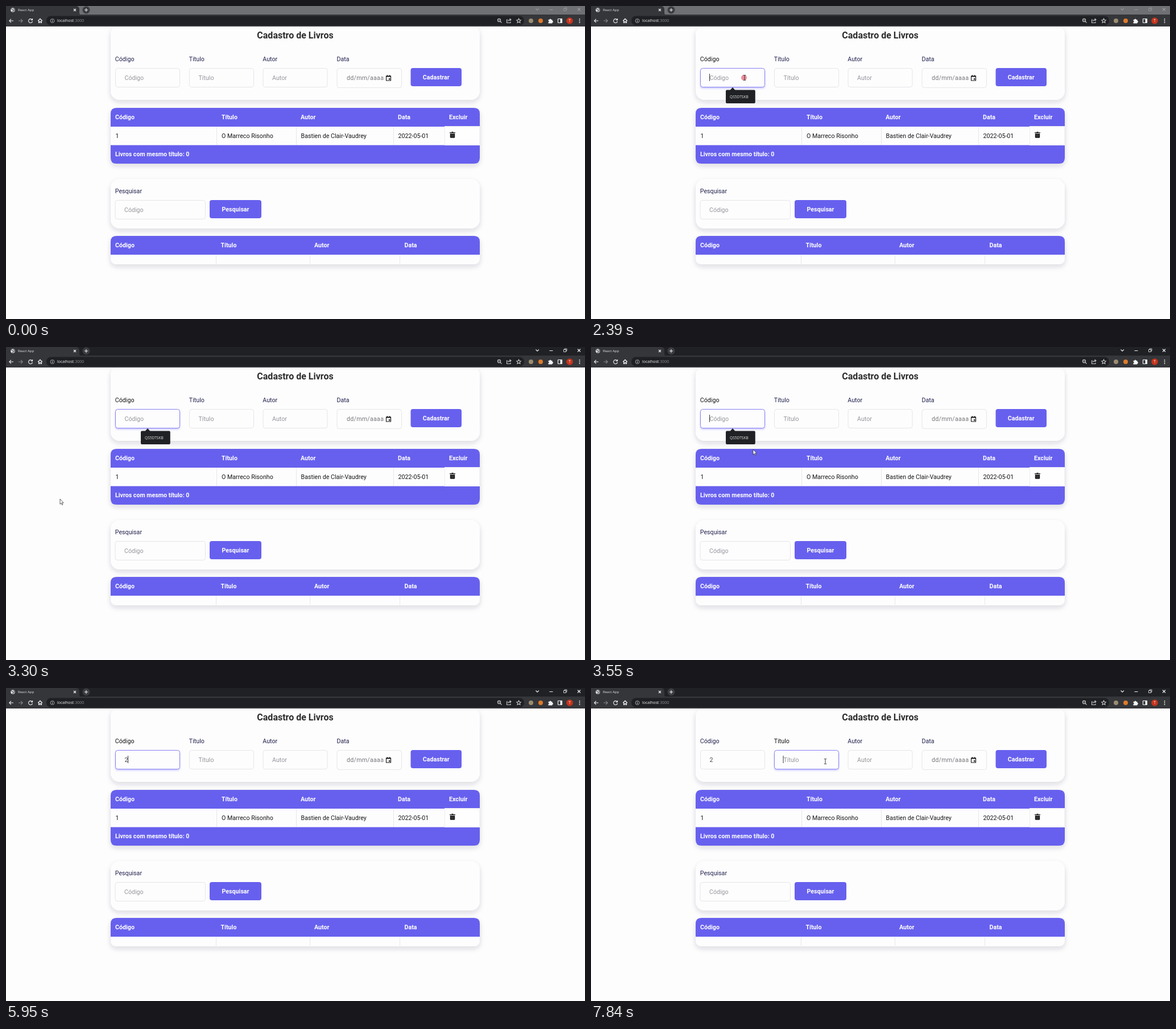
Write an HTML page that moves like this. It is 1018 px wide and 550 px high and loops after 8000 ms.

```html
<!DOCTYPE html>
<html lang="pt">
<head>
<meta charset="utf-8">
<title>Cadastro de Livros</title>
<style>
  html, body { margin: 0; width: 100%; height: 100%; overflow: hidden; background: #fdfdfd; }
  svg { display: block; }
  text { font: 10.67px Roboto, Arial, sans-serif; white-space: pre; }
  .ui { font-family: "Open Sans", "Noto Sans", sans-serif; }
  .bold { font-weight: 700; fill: #fff; }
  .label { fill: #20204c; }
  .hint { fill: #96969c; }
  .cell { fill: #161616; }
  .line { fill: none; stroke: #e8e8eb; }
  .icon { fill: none; stroke: #f1f1f1; stroke-width: 1.1; }
</style>
</head>
<body>
<svg id="stage" width="1018" height="550" viewBox="0 0 1018 550"></svg>
<script>
const LOOP = 8000;
const PURPLE = '#6760ee';
const stage = document.getElementById('stage');

const rect = (x, y, w, h, fill, r = 0, extra = '') =>
  `<rect x="${x}" y="${y}" width="${w}" height="${h}" rx="${r}" fill="${fill}" ${extra}/>`;
const text = (x, y, value, cls, extra = '') =>
  `<text x="${x}" y="${y}" class="${cls}" ${extra}>${value}</text>`;
const path = (d, extra = 'class="icon"') => `<path d="${d}" ${extra}/>`;
const dot = (x, y, r, fill, extra = '') => `<circle cx="${x}" cy="${y}" r="${r}" fill="${fill}" ${extra}/>`;
const middle = 'text-anchor="middle"';

const card = (y, h, r) => rect(184, y, 649, h, '#fdfdfe', r, 'filter="url(#shadow)"');
const button = (x, y, w, label) =>
  rect(x, y, w, 32, PURPLE, 4) + text(x + w / 2, y + 19.8, label, 'bold', middle);
const input = (id, x, y, w, h, hint) =>
  rect(x + .5, y + .5, w - 1, h - 1, '#fdfdfe', 4, `id="${id}Box" stroke="#e6e6e9"`) +
  text(x + 16.5, y + 20.5, hint, 'hint', `id="${id}Text"`);
const headings = (y, items) => items.map(([x, label]) => text(x, y, label, 'bold')).join('');
const columns = (xs, top, bottom) => path(xs.map(x => `M${x}.5 ${top}V${bottom}`).join(''), 'class="line"');

function browserBar() {
  return rect(0, 0, 1018, 16, '#6f7073', 0, 'id="titleBar"') +
    path('M0 16V0H123Q128 0 129 5V12Q129 15 133 16Z', 'fill="#35363a"') +
    rect(0, 15, 1018, 21, '#35363a') +
    rect(71, 17.5, 840, 16.5, '#1f2023', 8) +
    // tab
    dot(12, 7, 3.8, '#d8dadd') + path('M9 5l3 1 1 3-2 1M13 4l2 2-1 3', 'fill="none" stroke="#44464a"') +
    text(21, 9.3, 'React App', 'ui', 'fill="#e8e8e8" style="font-size:6px"') +
    path('M119 5l4 4M123 5l-4 4') +
    dot(141, 7, 6.5, '#3c3d41') + path('M138 7h6M141 4v6') +
    // navigation
    path('M13 26H6M9 22.8L5.8 26L9 29.2') +
    path('M22 26h7M26 22.8L29.2 26L26 29.2', 'class="icon" style="stroke:#85878b"') +
    path('M46 24.2A3.5 3.5 0 1 0 46.5 27M46.5 22v2.8h-2.8') +
    path('M56.2 26L60 22.3L63.8 26M57.5 25.5V29.5H59V27H61V29.5H62.5V25.5') +
    dot(81.5, 26, 3.4, 'none', 'stroke="#c8cacd" stroke-width=".8"') +
    path('M81.5 25.5v2.4M81.5 23.8v.9', 'stroke="#d5d5d5"') +
    text(90, 28.4, 'localhost<tspan fill="#8f9195">:3000</tspan>', 'ui', 'fill="#f2f2f2" style="font-size:7px"') +
    // toolbar icons
    `<g opacity=".8">${dot(867, 25, 2.6, 'none', 'class="icon"')}${path('M869 27l2.6 2.6M865.8 25h2.4')}` +
    path('M882 24h-1.5v5.5h6.5v-2M882.5 27q.5-3 5-3M885.5 22l2.5 2-2.5 2') +
    `${path('M901.5 22l1.1 2.5 2.7.3-2 1.9.6 2.7-2.4-1.4-2.4 1.4.6-2.7-2-1.9 2.7-.3z')}</g>` +
    dot(923, 26, 4, '#9a8d70') + dot(940, 26, 4, '#dd7b2b') +
    path('M953.5 24h2a1.5 1.5 0 1 1 3 0h2v2a1.5 1.5 0 1 1 0 3v1.5h-7v-2.3a1.2 1.2 0 0 0 0-2.4z', 'fill="#f4f4f4"') +
    rect(970.5, 22.5, 7, 7, 'none', .5, 'stroke="#f4f4f4" stroke-width="1.2"') + rect(974.5, 22.5, 3, 7, '#f4f4f4') +
    dot(991, 26, 5.8, '#c5341c') + text(991, 28.4, 'T', 'ui', `${middle} fill="#fff" style="font-size:6.5px"`) +
    [23, 26, 29].map(y => dot(1008.5, y, .9, '#f1f1f1')).join('') +
    `<g id="controls">${path('M931.5 4.5l2.7 2.7 2.7-2.7M955.5 6.5h6M1005 3.5l5 5M1010 3.5l-5 5')}` +
    path('M980.5 4.5h4v4h-4zM982 4.5v-1.5h4v4h-1.5', 'class="icon" style="stroke-width:.8"') + '</g>';
}

function bookTable() {
  return card(179, 98, 10) +
    path('M184 212V189Q184 179 194 179H823Q833 179 833 189V212Z', `fill="${PURPLE}"`) +
    path('M184 244.5V267Q184 277 194 277H823Q833 277 833 267V244.5Z', `fill="${PURPLE}"`) +
    headings(199, [[192, 'Código'], [379, 'Título'], [518, 'Autor'], [689, 'Data'], [779, 'Excluir']]) +
    columns([370, 510, 681], 212, 244) +
    rect(771.5, 211.5, 61.5, 33, '#fefefe', 0, 'stroke="#ececef"') +
    text(192.5, 232, '1', 'cell') +
    text(379, 232, 'O Marreco Risonho', 'cell') +
    text(518.5, 232, 'Bastien de Clair-Vaudrey', 'cell') +
    text(689.5, 232, '2022-05-01', 'cell') +
    path('M780 222h3l.7-1h2.6l.7 1h3v1.3h-10zM780.8 224.2h8.4v6.3q0 1.3-1.3 1.3h-5.8q-1.3 0-1.3-1.3z', 'fill="#151515"') +
    path('M783 225.5v5M785 225.5v5M787 225.5v5', 'stroke="#777" stroke-width=".6"') +
    text(192, 264, 'Livros com mesmo título: 0', 'bold');
}

function resultTable() {
  return card(404, 50, 10) +
    path('M184 437V414Q184 404 194 404H823Q833 404 833 414V437Z', `fill="${PURPLE}"`) +
    headings(424, [[192, 'Código'], [377.5, 'Título'], [542, 'Autor'], [700.5, 'Data']]) +
    columns([369, 534, 692], 437, 453);
}

stage.innerHTML = `
  <defs>
    <filter id="shadow" x="-5%" y="-30%" width="110%" height="170%">
      <feDropShadow dx="0" dy="4" stdDeviation="4" flood-color="#30304a" flood-opacity=".16"/>
    </filter>
    <filter id="glow" x="-10%" y="-30%" width="120%" height="170%">
      <feDropShadow dx="0" dy="2" stdDeviation="1.5" flood-color="#6c63ff" flood-opacity=".35"/>
    </filter>
  </defs>` +
  rect(0, 0, 1018, 550, '#fdfdfd') +
  card(34, 131, 16) +
  text(508.5, 56.8, 'Cadastro de Livros', 'bold', `${middle} style="font-size:16px;fill:#2c2c2c"`) +
  [['code', 192, 'Código'], ['title', 322, 'Título'], ['author', 451.5, 'Autor']].map(([id, x, name]) =>
    text(x - .2, 97, name, 'label', `id="${id}Label"`) + input(id, x, 109, 114, 34, name)).join('') +
  text(581.5, 97, 'Data', 'label') +
  rect(582, 109.5, 113.5, 34, '#fdfdfe', 4, 'stroke="#e6e6e9"') +
  text(599, 130, 'dd/mm/aaaa', '', 'fill="#77777b" letter-spacing=".25"') +
  path('M668.5 123h8v8h-8zM668.5 124h8M670.5 121.3v2M674.5 121.3v2', 'fill="none" stroke="#111" stroke-width="1.1"') +
  rect(673, 127.2, 2.3, 2.3, '#111') +
  button(711.5, 109, 89.5, 'Cadastrar') +
  bookTable() +
  card(304, 87, 16) +
  text(191.8, 328.8, 'Pesquisar', 'label') +
  input('search', 191.5, 341, 159.5, 34, 'Código') +
  button(358, 341, 91, 'Pesquisar') +
  resultTable() +
  browserBar() +
  `<g id="suggestion">${path('M244 148.5L249 143L254 148.5Z', 'fill="#202124"')}` +
  rect(237, 147.5, 51.8, 23.5, '#202124', 2) +
  text(244, 161.8, 'QS5DTSKB', 'ui', 'fill="#e6e6e6" style="font-size:6.6px"') + '</g>' +
  rect(0, 119, .9, 13, '#222', 0, 'id="caret"') +
  dot(269, 126, 5, '#e0485a', 'id="click" opacity=".6"') +
  path('M-2.2-4.4H-.5L0-4L.5-4.4H2.2M0-4V4M-2.2 4.4H-.5L0 4L.5 4.4H2.2', 'id="beam" fill="none" stroke="#2a2a2a" stroke-width=".9"') +
  path('M0 0V9.2L2.1 7.3L3.5 10.5L4.9 9.9L3.5 6.8H6.2Z', 'id="arrow" fill="#fff" stroke="#222" stroke-width=".7"');

const el = {};
stage.querySelectorAll('[id]').forEach(node => el[node.id] = node);

// Each entry holds until the next one: time, pointer shape, x, y.
const pointer = [
  [0, ''],
  [250, 'arrow', 165, 301], [380, 'arrow', 230, 272], [500, 'arrow', 310, 235], [630, 'arrow', 375, 190],
  [760, 'arrow', 358, 150], [880, 'beam', 320, 128], [1010, 'beam', 283, 121],
  [1260, 'beam', 276, 124], [1390, 'beam', 270, 126],
  [2520, 'beam', 262, 130], [2650, 'arrow', 215, 165], [2770, 'arrow', 140, 215], [2900, 'arrow', 93, 253],
  [3300, 'arrow', 95, 267], [3430, 'arrow', 165, 235], [3550, 'arrow', 285, 180],
  [3680, 'arrow', 388, 146], [3800, 'beam', 383, 134], [3930, 'beam', 375.5, 129],
  [4180, ''],
  [6200, 'arrow', 330, 268], [6330, 'arrow', 380, 215], [6450, 'arrow', 437, 158],
  [6580, 'beam', 430, 135], [6700, 'beam', 412, 129],
  [6830, ''], [7080, 'beam', 412, 129]
];
// Caret position from each time on; 0 means blinked off.
const caret = [
  [0, 0], [2390, 208], [2900, 0], [3430, 208], [3800, 214], [4310, 0], [4810, 214],
  [5320, 0], [5950, 214], [6450, 0], [6830, 337.6], [7340, 0], [7840, 337.6]
];

const latest = (track, t) => track.filter(entry => entry[0] <= t).pop();
const show = (node, on) => node.setAttribute('visibility', on ? 'visible' : 'hidden');

function setFocus(id, on) {
  el[id + 'Box'].setAttribute('stroke', on ? '#8983f3' : '#e6e6e9');
  on ? el[id + 'Box'].setAttribute('filter', 'url(#glow)') : el[id + 'Box'].removeAttribute('filter');
  el[id + 'Label'].style.fill = on ? '#111' : '';
}

function render(t) {
  const active = t >= 2520;
  el.titleBar.setAttribute('fill', active ? '#202124' : '#6f7073');
  el.controls.setAttribute('opacity', active ? 1 : .3);

  setFocus('code', t >= 2390 && t < 6830);
  setFocus('title', t >= 6830);
  const typed = t >= 3800;
  el.codeText.textContent = typed ? '2' : 'Código';
  el.codeText.style.fill = typed ? '#4a4a4e' : '';
  show(el.suggestion, t >= 2390 && !typed);
  show(el.click, t >= 2390 && t < 2520);

  const caretX = latest(caret, t)[1];
  show(el.caret, caretX > 0);
  el.caret.setAttribute('x', caretX);

  const [, shape, x, y] = latest(pointer, t);
  for (const name of ['beam', 'arrow']) {
    show(el[name], shape === name);
    if (shape === name) el[name].setAttribute('transform', `translate(${x} ${y})`);
  }
}

const start = performance.now();
function tick() {
  render((performance.now() - start) % LOOP);
  requestAnimationFrame(tick);
}
tick();
</script>
</body>
</html>
```
